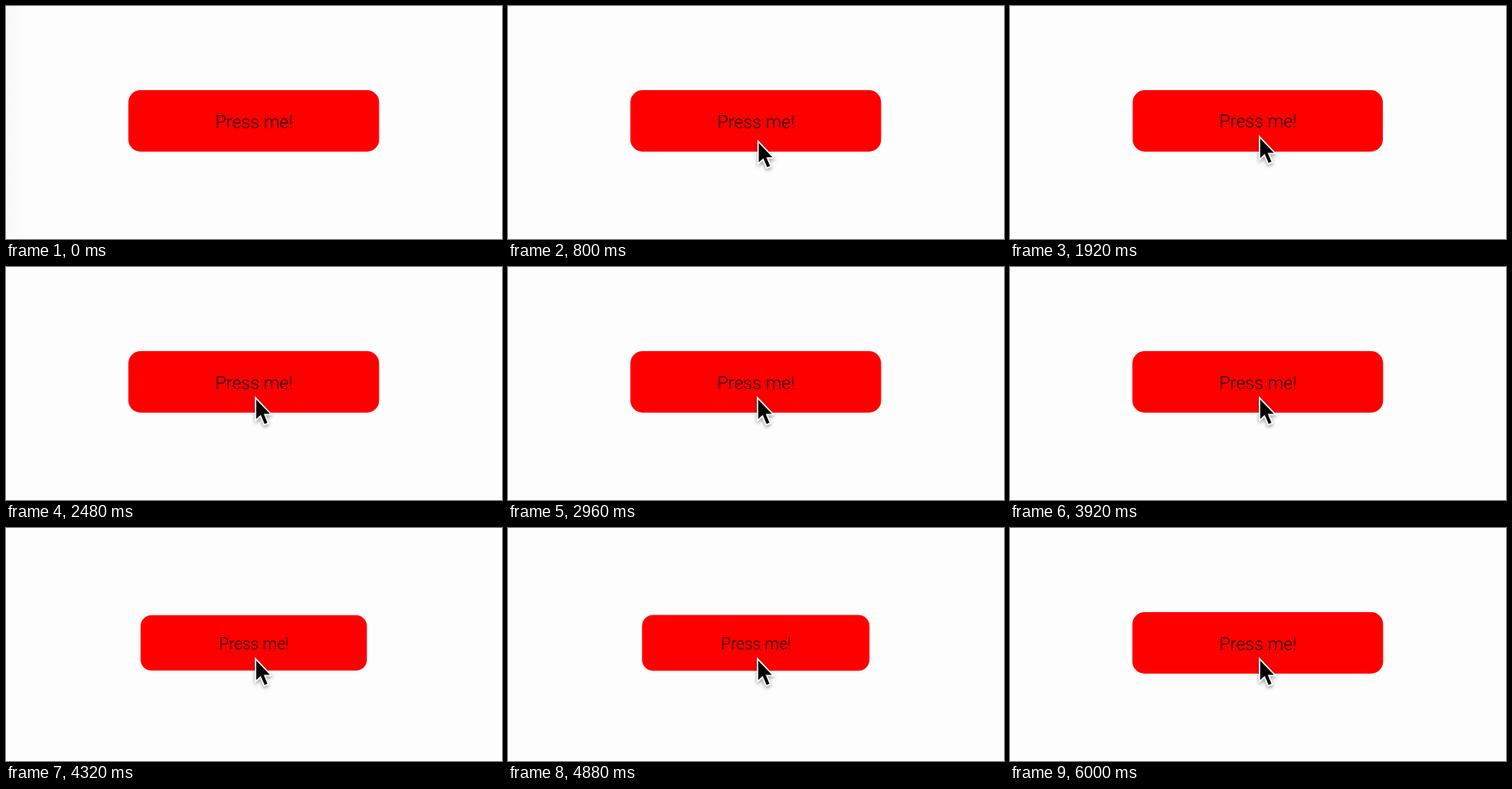
Recreate the animation shown at these times as an HTML page with a canvas. Size 612x288 px, loop 6320 ms.

```html
<!DOCTYPE html>
<html lang="en">
<head>
<meta charset="utf-8">
<title>Press button</title>
<style>
  html, body { margin: 0; width: 100%; height: 100%; overflow: hidden; background: #fdfdfd; }
  canvas { display: block; }
</style>
</head>
<body>
<canvas id="stage" width="612" height="288"></canvas>
<script>
const ctx = document.getElementById('stage').getContext('2d');
const W = 612, H = 288;
const LOOP = 6320, STEP = 80;
const DOWN = 100, UP = 120, DEPTH = 0.1;

const presses = [
  { at: 1910, hold: 0 },
  { at: 2630, hold: 70 },
  { at: 3350, hold: 0 },
  { at: 4230, hold: 0 },
  { at: 4797, hold: 0 }
];

const clamp = v => Math.min(1, Math.max(0, v));
const smooth = v => Math.sin(clamp(v) * Math.PI / 2) ** 2;
const lerp = (a, b, k) => a + (b - a) * k;

function buttonScale(t) {
  let depth = 0;
  for (const { at, hold } of presses) {
    const u = t - at;
    depth += smooth(u / DOWN) - smooth((u - DOWN - hold) / UP);
  }
  return 1 - DEPTH * depth;
}

function drawBackground(t) {
  ctx.fillStyle = '#fdfdfd';
  ctx.fillRect(0, 0, W, H);
  if (t < 240) {
    const g = ctx.createLinearGradient(0, 0, 30, 0);
    g.addColorStop(0, '#f9f9f9');
    g.addColorStop(1, '#fdfdfd');
    ctx.fillStyle = g;
    ctx.fillRect(0, 0, 30, H);
  }
}

function drawButton(scale) {
  ctx.save();
  ctx.translate(305.7, 142);
  ctx.scale(scale, scale);
  ctx.beginPath();
  ctx.roundRect(-154.7, -38, 309.4, 76, 15);
  ctx.fillStyle = '#fe0000';
  ctx.fill();
  ctx.font = '300 22px Roboto, sans-serif';
  ctx.textAlign = 'center';
  ctx.fillStyle = '#200000';
  ctx.fillText('Press me!', 0.3, 8.5);
  ctx.restore();
}

function drawCursor(t) {
  if (t < 240) return;
  const k = 1 - (1 - clamp((t - 160) / 800)) ** 2;
  ctx.save();
  ctx.translate(lerp(326, 308, k), lerp(296, 162, k));
  ctx.beginPath();
  [[0.7, 1.8], [0.7, 26], [6.3, 20.8], [11, 32], [14.6, 30.5], [10, 19.6], [17.6, 19.6]]
    .forEach(([x, y]) => ctx.lineTo(x, y));
  ctx.closePath();
  ctx.lineJoin = 'miter';
  ctx.lineWidth = 3.4;
  ctx.strokeStyle = '#fff';
  ctx.shadowColor = 'rgba(0,0,0,0.4)';
  ctx.shadowBlur = 4;
  ctx.shadowOffsetY = 2;
  ctx.stroke();
  ctx.shadowColor = 'transparent';
  ctx.fillStyle = '#000';
  ctx.fill();
  ctx.restore();
}

const begin = performance.now();

function frame() {
  const elapsed = (performance.now() - begin) % LOOP;
  const t = Math.floor(elapsed / STEP) * STEP;
  drawBackground(t);
  drawButton(buttonScale(t));
  drawCursor(t);
  requestAnimationFrame(frame);
}
frame();
</script>
</body>
</html>
```
